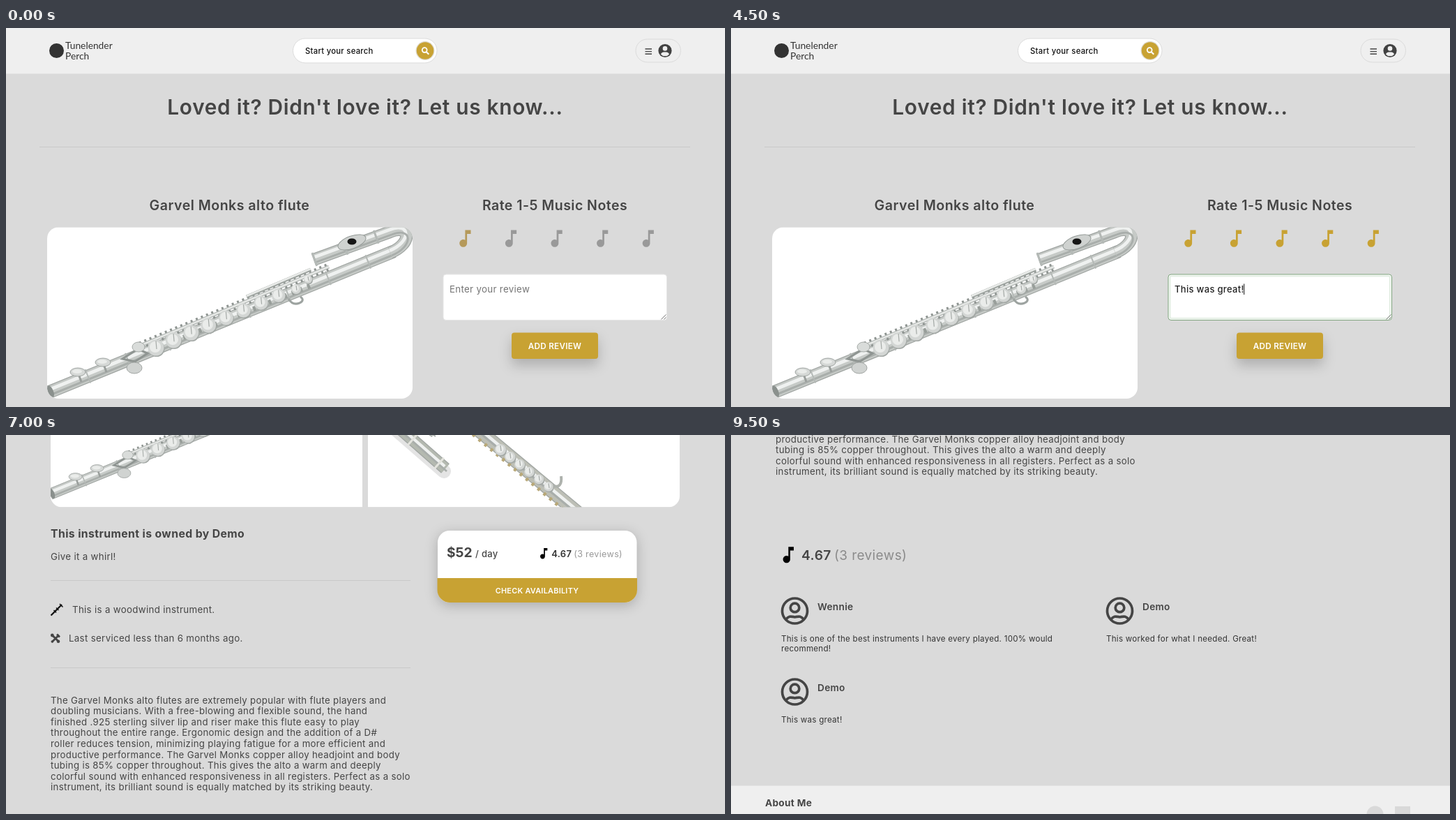
These frames come from a looping animation (1031x543 px, 9600 ms). An HTML page:

```html
<!DOCTYPE html>
<html lang="en">
<head>
<meta charset="utf-8">
<title>Instrument rental review</title>
<style>
  html, body { margin: 0; width: 100%; height: 100%; overflow: hidden; background: #dadada; }
  #stage { display: block; width: 1031px; height: 543px; }
  text { font-family: Inter, "Open Sans", sans-serif; letter-spacing: .024em; white-space: pre; }
  .logo { font-family: Lato, sans-serif; letter-spacing: 0; }
  .button { filter: drop-shadow(0 9px 9px rgba(0,0,0,.2)); }
  .card { filter: drop-shadow(0 4px 9px rgba(0,0,0,.22)); }
</style>
</head>
<body>
<svg id="stage" viewBox="0 0 1031 543" xmlns="http://www.w3.org/2000/svg"></svg>
<script>
const LOOP = 9600, STEP = 100;
const INK = '#454545', GOLD = '#c8a233', BRAND = 'Garvel Monks';

const text = (x, y, size, weight, str, fill = INK, anchor = 'start', extra = '') =>
  `<text x="${x}" y="${y}" font-size="${size}" font-weight="${weight}" fill="${fill}" text-anchor="${anchor}" ${extra}>${str}</text>`;
const rect = (x, y, w, h, fill, r = 0, extra = '') =>
  `<rect x="${x}" y="${y}" width="${w}" height="${h}" rx="${r}" fill="${fill}" ${extra}/>`;
const circle = (x, y, r, fill, extra = '') => `<circle cx="${x}" cy="${y}" r="${r}" fill="${fill}" ${extra}/>`;
const ellipse = (x, y, rx, ry, fill, extra = '') =>
  `<ellipse cx="${x}" cy="${y}" rx="${rx}" ry="${ry}" fill="${fill}" ${extra}/>`;
const line = (d, color, w, extra = '') =>
  `<path d="${d}" fill="none" stroke="${color}" stroke-width="${w}" ${extra}/>`;
const rule = (x1, x2, y) => line(`M${x1} ${y}H${x2}`, '#c9c9c9', 1);
const clipBox = (x, y, w, h, body) =>
  `<svg x="${x}" y="${y}" width="${w}" height="${h}" viewBox="${x} ${y} ${w} ${h}">${rect(x, y, w, h, '#fff')}${body}</svg>`;

// x, y is the top left corner of the visible glyph
const note = (x, y, scale, fill, extra = '') =>
  `<path transform="translate(${x} ${y}) scale(${scale}) translate(-6 -3)" fill="${fill}" ${extra}
    d="M12 3v10.55c-.59-.34-1.27-.55-2-.55-2.21 0-4 1.79-4 4s1.79 4 4 4 4-1.79 4-4V7h4V3z"/>`;

const tube = (d, w, tone = '#c6cac7') =>
  line(d, '#a0a5a2', w) + line(d, tone, w - 2.5) +
  line(d, '#eff1f0', w * .26, 'transform="translate(-1 -3)"') +
  line(d, '#a9aeab', w * .16, 'transform="translate(2 4)"');

const padKey = (x, y, r) =>
  circle(x + 1, y + 1.5, r, '#a3a8a5') + circle(x, y, r, '#d3d6d4') +
  circle(x - 1, y - 1, r * .7, '#eaecea') + line(`M${x} ${y - r + 2}l1 ${r}`, '#a4a9a6', 1.2);

const keyRow = (n, x, y, dx, dy, r) =>
  Array.from({ length: n }, (_, i) => padKey(x + dx * i, y + dy * i, r - .25 * i)).join('');

function flute() {
  const body = 'M-260 114L235 -88';
  const head = 'M230 -86C262 -99 260 -128 230 -116L120 -76';
  const rods = 'M-136 50L142 -66';
  const lever = (x, y) => line(`M${x} ${y}l5 14`, '#9a9f9c', 3) +
    ellipse(x, y, 11, 6, '#d5d8d6', 'stroke="#a0a5a2"') + ellipse(x - 1, y - 1, 7, 3, '#eaecea');
  return tube(body, 19) + tube(head, 18) +
    line(body, '#b4b9b6', 21, 'stroke-dasharray="2 60" stroke-dashoffset="-60"') +
    line('M120 -76L230 -116', '#b4b9b6', 20, 'stroke-dasharray="3 44"') +
    ellipse(-257, 113, 4, 9, '#8a908d', 'transform="rotate(-22 -257 113)"') +
    line(rods, '#8e9491', 11, 'stroke-dasharray="3 5"') + line(rods, '#b1b6b3', 5) + line(rods, '#e6e8e6', 2.5) +
    line('M-100 49L116 -39', '#989e9a', 7, 'stroke-dasharray="4 8"') +
    line('M24 -23L116 -62', '#9ea4a0', 5) + line('M24 -24L116 -63', '#e9ebe9', 2.5) +
    line('M-154 66l22 -14 14 6 -18 12z', '#8f9592', 3) +
    lever(-218, 85) + lever(-182, 71) +
    ellipse(-137, 79, 11, 8, '#d0d3d1', 'stroke="#a0a5a2"') +
    ellipse(-131, 49, 9, 7, '#d9dcda', 'stroke="#a4a9a6"') +
    keyRow(8, -106, 50, 25.1, -10.7, 11.5) +
    padKey(95, -34, 7) + padKey(112, -48, 6) +
    line('M84 -20q6 10 16 6q8 -4 1 -9', '#9da3a0', 3) +
    ellipse(175, -101, 21, 9, '#cfd2d0', 'stroke="#949a97" transform="rotate(-20 175 -101)"') +
    ellipse(175, -102, 6.5, 4.5, '#161616');
}

const upperPhoto = () => {
  const d = 'M680 284L822 156';
  return tube(d, 20, '#d0cacc') + line(d, '#a79fa2', 7, 'stroke-dasharray="3 6" transform="translate(-8 -6)"') +
    keyRow(5, 708, 259, 13, -11, 10);
};
const lowerPhoto = () => {
  const pipe = 'M548 270L630 342', body = 'M668 279L822 407';
  return line('M552 280L628 346', '#e4e4e4', 20, 'stroke-linecap="round"') +
    tube(pipe, 18, '#b4b9b0') +
    line(pipe, '#e4e4de', 20, 'stroke-dasharray="3 48" stroke-dashoffset="-45"') +
    tube('M596 280L614 292', 12) + tube(body, 20, '#bdbfb6') +
    line(body, '#b8a878', 5, 'stroke-dasharray="4 7" transform="translate(-7 7)"') +
    line('M784 367q14 4 12 -14', '#aeb2ad', 4) +
    keyRow(6, 709, 315, 13.8, 10.6, 8);
};

const userBadge = () =>
  circle(945, 32.5, 9.6, '#424242') + circle(945, 29.4, 3.3, '#efefef') +
  '<path d="M938.8 37.4q1.7 -3 4 -3h4.4q2.3 0 4 3a8 8 0 0 1 -12.4 0z" fill="#efefef"/>';

const header = () =>
  rect(0, 0, 1031, 65.5, '#efefef') +
  circle(72.5, 32.5, 10.5, '#333') +
  text(85, 30, 13.8, 400, 'Tunelender', '#333', 'start', 'class="logo"') +
  text(85, 45, 13.8, 400, 'Perch', '#333', 'start', 'class="logo"') +
  rect(411.5, 15, 206.5, 35, '#fff', 17.5, 'stroke="#dcdcdc"') +
  text(429, 37, 11.3, 500, 'Start your search', '#111') +
  circle(601, 32.5, 13.5, '#ddd9cd') + circle(601, 32.5, 12.2, GOLD) +
  circle(600.2, 31.6, 3.4, 'none', 'stroke="#fff" stroke-width="1.8"') + line('M602.7 34.2l3.6 3.6', '#fff', 2) +
  rect(903, 16, 64.5, 33, '#efefef', 16.5, 'stroke="#dbdbdb"') +
  line('M916.5 30H926M916.5 33.6H926M916.5 37.2H926', INK, 1.4) + userBadge();

const reviewPage = () =>
  header() +
  text(515, 123.5, 29.8, 600, "Loved it? Didn't love it? Let us know...", INK, 'middle') +
  rule(48, 981, 170.5) +
  text(320.5, 261, 19.6, 600, BRAND + ' alto flute', INK, 'middle') +
  text(787, 261, 19.5, 600, 'Rate 1-5 Music Notes', INK, 'middle') +
  `<g clip-path="url(#hero)">${rect(59, 285.5, 524, 245.5, '#fff')}<use href="#flute" transform="translate(321 408)"/></g>` +
  [0, 1, 2, 3, 4].map(i => note(650.3 + 65.6 * i, 289.5, 1.35, '#999', 'class="star"')).join('') +
  rect(627, 353, 320.5, 65.5, '#fff', 4, 'id="field"') +
  rect(629.5, 355.5, 315.5, 60.5, 'none', 2, 'id="ring" stroke="#e3eee3" stroke-width="2"') +
  line('M939.5 417.5l7 -7M943.5 417.5l3 -3', '#777', 1) +
  text(636, 378.5, 13.3, 400, 'Enter your review', '#757575', 'start', 'id="hint"') +
  text(636, 378.5, 13, 500, '', '#222', 'start', 'id="typed"') +
  rect(636, 366.5, 1, 15.5, '#111', 0, 'id="caret"') +
  rect(725, 436.5, 124, 37.5, GOLD, 4, 'class="button"') +
  text(787, 459.5, 11.7, 600, 'ADD REVIEW', '#fff', 'middle');

const avatar = (x, y) =>
  `<g transform="translate(${x} ${y})" fill="none" stroke="${INK}" stroke-width="3.7">
    <circle r="18"/><circle cy="-4.6" r="6.3"/><path d="M-13 12.5C-8 5.5 -4 8.8 0 8.8S8 5.5 13 12.5"/></g>`;

const review = (x, y, name, lines) =>
  avatar(x + 19.5, y) + text(x + 52, y - 1.3, 13.6, 600, name) +
  lines.map((s, i) => text(x, y + 43.6 + 14.7 * i, 11.55, 400, s, '#333')).join('');

const blurb = [
  `The ${BRAND} alto flutes are extremely popular with flute players and`,
  'doubling musicians. With a free-blowing and flexible sound, the hand',
  'finished .925 sterling silver lip and riser make this flute easy to play',
  'throughout the entire range. Ergonomic design and the addition of a D#',
  'roller reduces tension, minimizing playing fatigue for a more efficient and',
  `productive performance. The ${BRAND} copper alloy headjoint and body`,
  'tubing is 85% copper throughout. This gives the alto a warm and deeply',
  'colorful sound with enhanced responsiveness in all registers. Perfect as a solo',
  'instrument, its brilliant sound is equally matched by its striking beauty.'
];

const rating = gray =>
  `<tspan class="score" font-weight="600">4.5</tspan><tspan class="count" dx="3" font-size="12.6" font-weight="400" fill="${gray}">(2 reviews)</tspan>`;

const detailPage = () =>
  header() +
  text(64, 104, 19.6, 600, BRAND + ' alto flute') +
  note(66, 121.5, .86, '#000', 'class="late"') +
  text(86, 134, 13, 500, rating('#777') + '<tspan dx="7" font-weight="700">·</tspan><tspan dx="6">Chicago, Illinois</tspan>') +
  `<g clip-path="url(#gallery)">
    ${clipBox(64, 163.5, 447, 234, '<use href="#flute" transform="translate(287.5 280.5) scale(.862)"/>')}
    <g class="late">${clipBox(519, 163.5, 447, 113, upperPhoto())}${clipBox(519, 284.5, 447, 113, lowerPhoto())}</g></g>` +
  text(64, 441, 15.8, 700, 'This instrument is owned by Demo') +
  text(64, 473, 13.3, 400, 'Give it a whirl!') + rule(64, 580, 502.5) +
  line('M64.5 552.5L80 537', '#111', 2.2) + line('M68.5 545l3.5 3.5M72 541.5l3.5 3.5M77 536l4.5 4.5', '#111', 1.5) +
  text(95, 548.8, 13.3, 400, 'This is a woodwind instrument.') +
  line('M66 580.5L76 590.5M66 590.5L76 580.5', INK, 2.8) +
  circle(66.3, 581, 2.4, INK) + circle(75, 589.7, 2.3, INK) + circle(66.3, 590, 1.8, INK) + line('M73 579.5l4 4', INK, 2.6) +
  text(90, 590.2, 13.3, 400, 'Last serviced less than 6 months ago.') + rule(64, 580, 627.5) +
  blurb.map((s, i) => text(64, 678.8 + 15.54 * i, 13.25, 400, s)).join('') +
  `<g class="card">${rect(619, 431, 285.5, 103, '#fff', 17)}</g>` +
  `<path d="M618.5 499H905V516a18 18 0 0 1 -18 18H636.5a18 18 0 0 1 -18 -18z" fill="${GOLD}"/>` +
  text(632, 469.3, 19.2, 700, '$52', INK, 'start', 'style="letter-spacing:0"') + text(673, 469.3, 13, 500, '/ day') +
  note(0, 456, .86, '#000', 'id="cardNote" class="late"') +
  text(884, 469.3, 13, 500, rating('#999'), '#333', 'end') +
  text(761.5, 521, 10.9, 600, 'CHECK AVAILABILITY', '#fff', 'middle') +
  note(74.6, 906.3, 1.28, '#000') +
  text(101, 925.2, 19.2, 600, '4.67<tspan dx="4" font-weight="400" font-size="18.9" fill="#8b8b8b">(3 reviews)</tspan>') +
  review(72, 998, 'Wennie', ['This is one of the best instruments I have every played. 100% would', 'recommend!']) +
  review(538, 998, 'Demo', ['This worked for what I needed. Great!']) +
  review(72, 1114, 'Demo', ['This was great!']) +
  rect(0, 1248.5, 1031, 120, '#efefef') +
  text(49, 1277.8, 13.6, 700, 'About Me') +
  circle(923.5, 1289.5, 12, '#d9d9d9') + rect(952, 1278, 22, 22, '#d9d9d9');

const $ = id => document.getElementById(id);
const all = cls => [...document.getElementsByClassName(cls)];
const show = (el, on) => { el.style.display = on ? '' : 'none'; };

$('stage').innerHTML =
  `<defs><g id="flute">${flute()}</g>
    <clipPath id="hero">${rect(59, 285.5, 524, 245.5, '#fff', 16)}</clipPath>
    <clipPath id="gallery">${rect(64, 163.5, 902, 234, '#fff', 16)}</clipPath></defs>
  ${rect(0, 0, 1031, 543, '#dadada')}
  <g id="form">${reviewPage()}</g><g id="detail">${detailPage()}</g>`;

const stars = all('star'), late = all('late'), scores = all('score'), counts = all('count');
const message = 'This was great!';
// [time, letters typed]
const keys = [[2400, 1], [2500, 2], [2600, 3], [2700, 4], [2900, 6], [3100, 7], [3200, 8], [3300, 9],
  [3400, 10], [3600, 11], [3700, 13], [3800, 14], [4300, 15]];

const part = (t, from, to) => Math.min(1, Math.max(0, (t - from) / (to - from)));
const flick = p => 1 - (1 - p ** 1.365) ** 2;
const scrollAt = t => Math.round(
  316 * flick(part(t, 6200, 7200)) + 432 * flick(part(t, 7200, 7900)) - 2 * part(t, 7900, 8200));

function drawForm(t) {
  stars.forEach((s, i) => {
    const lit = i ? t >= 800 + 100 * i : t >= 100;
    s.setAttribute('fill', lit ? GOLD : i ? '#999' : '#b5995a');
  });
  const focused = t >= 2000;
  $('field').setAttribute('stroke', focused ? '#7da37b' : '#e6e6e6');
  show($('ring'), focused);
  const typed = keys.reduce((n, [at, len]) => t >= at ? len : n, 0);
  show($('hint'), !typed);
  show($('caret'), focused);
  $('typed').textContent = message.slice(0, typed);
  $('caret').setAttribute('x', 636 + (typed ? $('typed').getComputedTextLength() - .5 : 0));
}

function drawDetail(t) {
  const updated = t >= 6100;
  late.forEach(el => show(el, t >= 5800));
  scores.forEach(el => { el.textContent = updated ? '4.67' : '4.5'; });
  counts.forEach(el => { el.textContent = updated ? '(3 reviews)' : '(2 reviews)'; });
  $('cardNote').setAttribute('transform', `translate(${updated ? 766 : 774} 456) scale(.86) translate(-6 -3)`);
  $('detail').setAttribute('transform', `translate(0 ${-scrollAt(t)})`);
}

const start = performance.now();
function tick() {
  const t = Math.floor((performance.now() - start) % LOOP / STEP) * STEP;
  const onForm = t < 5500;
  show($('form'), onForm);
  show($('detail'), !onForm);
  (onForm ? drawForm : drawDetail)(t);
  requestAnimationFrame(tick);
}
tick();
</script>
</body>
</html>
```
